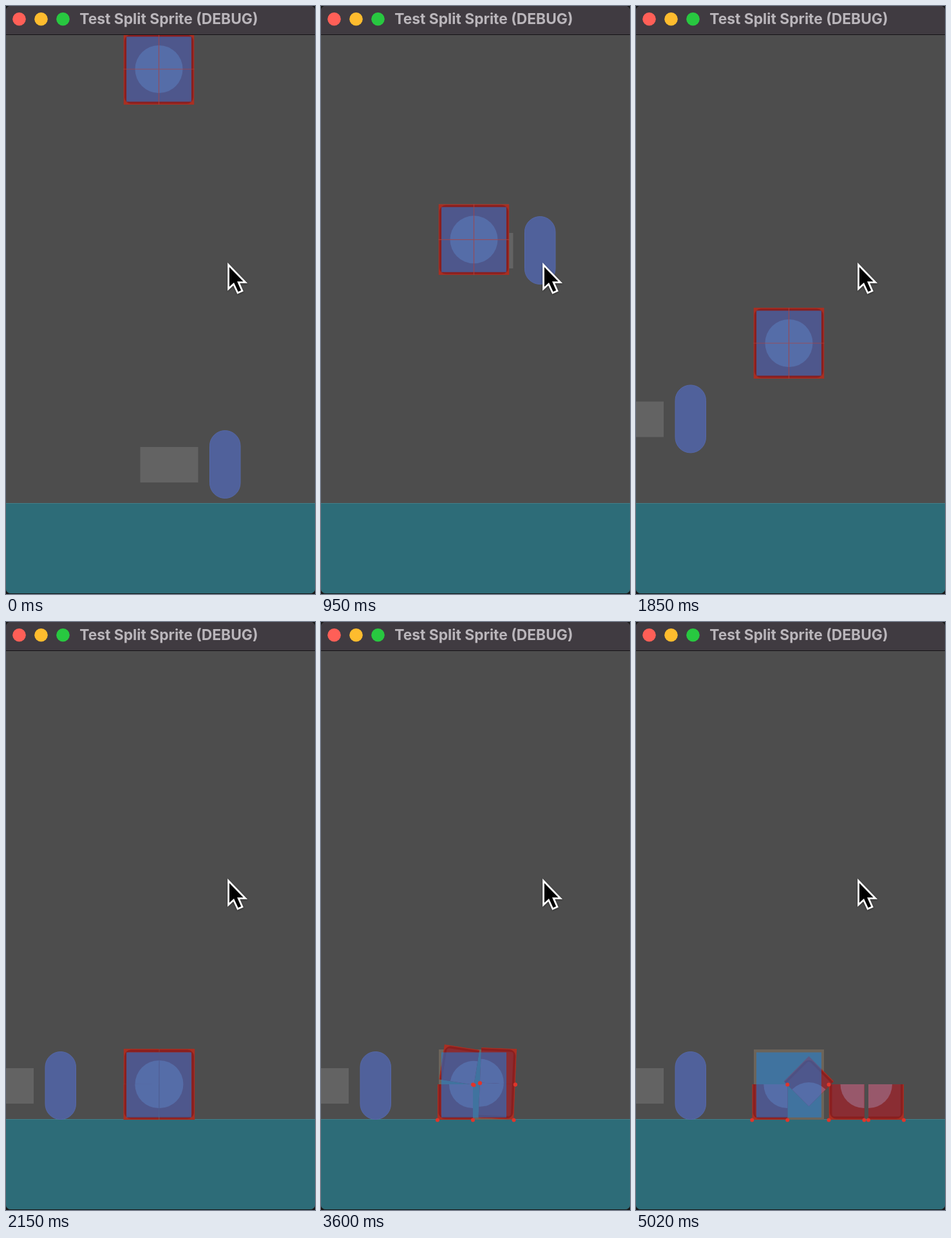
Recreate the animation shown at these times as an HTML page. Size 480 by 912 pixels, loop 5080 ms.

```html
<!DOCTYPE html>
<html lang="en">
<head>
<meta charset="utf-8">
<title>Test Split Sprite</title>
<style>
html, body { margin: 0; width: 100%; height: 100%; overflow: hidden; background: #161616; }
svg { display: block; width: 480px; height: 912px; }
.title { font: 700 22.8px Inter, "Open Sans", sans-serif; fill: #bab6bb; }
.cursor { filter: drop-shadow(0 1.5px 1.5px rgba(0, 0, 0, .4)); }
</style>
</head>
<body>
<svg viewBox="0 0 480 912">
  <defs>
    <clipPath id="window"><rect width="480" height="911" rx="7"/></clipPath>
    <clipPath id="quarter"><rect x="-27.5" y="-27.5" width="55" height="55"/></clipPath>
    <g id="sprite">
      <rect x="-55" y="-55" width="110" height="110" fill="#a82f22"/>
      <rect x="-53.5" y="-53.5" width="107" height="107" rx="10" fill="#8a1f1f"/>
      <rect x="-50" y="-50" width="100" height="100" rx="4" fill="#8a2d33"/>
      <circle r="37" fill="#98586b"/>
    </g>
  </defs>
  <g clip-path="url(#window)">
    <rect width="480" height="912" fill="#4d4d4d"/>
    <rect y="771" width="480" height="141" fill="#2d6c78"/>
    <rect y="771" width="480" height="1" fill="#40808a"/>
    <g id="player">
      <rect id="hitbox" x="-107.5" y="26" width="90" height="55"/>
      <rect x=".5" y=".5" width="47.5" height="105" rx="23.75" fill="#50619b" stroke="#5568a8"/>
    </g>
    <rect id="frame" x="183" width="109" height="109" fill="#6c6459"/>
    <g id="pieces"></g>
    <rect id="body" x="187" width="101" height="101" fill="#1482e5" opacity=".5"/>
    <path id="seams" d="M-55 0H55M0-55V55" fill="none" stroke="#b04440" stroke-width="1.2" opacity=".7"/>
    <g id="dots" fill="#e0352b"></g>
    <rect width="480" height="44" fill="#403b41"/>
    <rect y="44" width="480" height="1" fill="#151316"/>
    <circle cx="20.5" cy="20.3" r="10.3" fill="#ff5f57"/>
    <circle cx="54.5" cy="20.3" r="10.3" fill="#febc2e"/>
    <circle cx="88.5" cy="20.3" r="10.3" fill="#28c840"/>
    <text class="title" x="114.3" y="27.6">Test Split Sprite (DEBUG)</text>
    <path class="cursor" d="M345.6 401.5V438.5L353.6 431.2L360 445L367 441.8L361.2 428.6H371.8Z" fill="#000" stroke="#fff" stroke-width="2.8"/>
  </g>
</svg>
<script>
const LOOP = 5080, STEP = 50, HALF = 27.5, FLOOR = 772;
const SPRITE_X = 237.5, SPRITE_G = 828, LAND = 2.1;
const TIP = 4.2, TOPPLED = 4.5;
const $ = id => document.getElementById(id);
const NS = 'http://www.w3.org/2000/svg';

function add(parent, tag, attrs) {
  const el = document.createElementNS(NS, tag);
  for (const k in attrs) el.setAttribute(k, attrs[k]);
  return parent.appendChild(el);
}

const phase = (t, from, to) => Math.min(1, Math.max(0, (t - from) / (to - from)));
const easeOut = k => 1 - (1 - k) ** 2;

function turn(x, y, deg) {
  const a = deg * Math.PI / 180, c = Math.cos(a), s = Math.sin(a);
  return [x * c - y * s, x * s + y * c];
}

// Pose of a square whose centre lies at (x, y) from a pivot before turning.
function around(px, py, x, y, deg) {
  const [dx, dy] = turn(x, y, deg);
  return [px + dx, py + dy, deg];
}

const quarters = { tr: [1, -1], br: [1, 1], bl: [-1, 1], tl: [-1, -1] };
const corners = Object.values(quarters);
const nodes = {}, dots = {};
for (const id in quarters) {
  const [sx, sy] = quarters[id];
  nodes[id] = add($('pieces'), 'g', { 'clip-path': 'url(#quarter)' });
  add(nodes[id], 'use', { href: '#sprite', x: -sx * HALF, y: -sy * HALF });
  dots[id] = corners.map(() => add($('dots'), 'circle', { r: 3 }));
}

function spriteTop(t) {
  if (t < 0.385) return 43;
  if (t < 1.506) return Math.min(370, 43 + SPRITE_G * (t - 0.385) ** 2);
  return Math.min(663, 370 + SPRITE_G * (t - 1.506) ** 2);
}

function playerPos(t) {
  const x = 316 - 255.5 * phase(t, 1, 1.255);
  const jump = t - 0.5, fall = t - 1.045;
  if (fall > 0) return [x, Math.min(666, 279 + 476 * fall * fall)];
  if (jump > 0) return [x, 666 - 976 * jump + 490 * jump * jump];
  return [x, Math.min(666, 658 + 80 * t)];
}

function wholePoses(top) {
  const p = {};
  for (const id in quarters) {
    const [sx, sy] = quarters[id];
    p[id] = [SPRITE_X + sx * HALF, top + 55 + sy * HALF, 0];
  }
  return p;
}

// The right pair topples like a pendulum while the upper left square rolls into the gap.
function splitPoses(t) {
  const spread = easeOut(phase(t, LAND, 2.85));
  const hop = 3 * Math.sin(Math.PI * phase(t, 2.6, 3.15));
  const tilt = Math.min(90, 27 * Math.exp(4 * (t - TIP)));
  const roll = Math.min(45, 45 * Math.exp(2.7 * (t - TIP)));
  const drop = easeOut(phase(t, TIP, 5));
  const foot = SPRITE_X + 2 * HALF + 7 * spread;
  const tr = around(foot, FLOOR, -HALF - hop / 2, -3 * HALF - hop, tilt);
  tr[0] += 6.5 * phase(t, TOPPLED, 4.8);
  return {
    tr,
    br: around(foot, FLOOR, -HALF, -HALF, tilt),
    bl: [210 - 1.5 * spread - 0.7 * drop, FLOOR - HALF, 0],
    tl: around(SPRITE_X + 31 * drop, 717 + roll / 11 + 30 * drop, -HALF, -HALF, roll)
  };
}

function touches(x, y, [px, py, a]) {
  const [lx, ly] = turn(x - px, y - py, -a);
  return Math.max(Math.abs(lx), Math.abs(ly)) < HALF + 2;
}

// A corner is marked where it meets the floor or another square.
function drawDots(p, settled) {
  for (const id in p) {
    const [x, y, a] = p[id];
    const others = Object.keys(p).filter(k => k !== id);
    corners.forEach(([sx, sy], i) => {
      const [dx, dy] = turn(sx * HALF, sy * HALF, a), cx = x + dx, cy = y + dy;
      const contact = cy > FLOOR - 2 || others.some(k => touches(cx, cy, p[k]));
      dots[id][i].setAttribute('cx', cx);
      dots[id][i].setAttribute('cy', cy + 0.5);
      dots[id][i].style.display = settled && contact ? '' : 'none';
    });
  }
}

function draw(ms) {
  const t = Math.floor(ms / STEP) * STEP / 1000;
  const top = spriteTop(t), whole = t < LAND;
  const p = whole ? wholePoses(top) : splitPoses(t);
  $('player').setAttribute('transform', `translate(${playerPos(t)})`);
  $('hitbox').setAttribute('fill', t >= 1 && t < 1.5 ? '#2f6c77' : '#636363');
  $('frame').setAttribute('y', top);
  $('body').setAttribute('y', top + 4.5);
  $('seams').setAttribute('transform', `translate(${SPRITE_X} ${top + 55})`);
  $('seams').style.display = whole ? '' : 'none';
  for (const id in p) {
    const [x, y, a] = p[id];
    nodes[id].setAttribute('transform', `translate(${x} ${y}) rotate(${a})`);
  }
  drawDots(p, t >= 3.2);
}

const start = performance.now();
function tick() {
  draw((performance.now() - start) % LOOP);
  requestAnimationFrame(tick);
}
tick();
</script>
</body>
</html>
```
